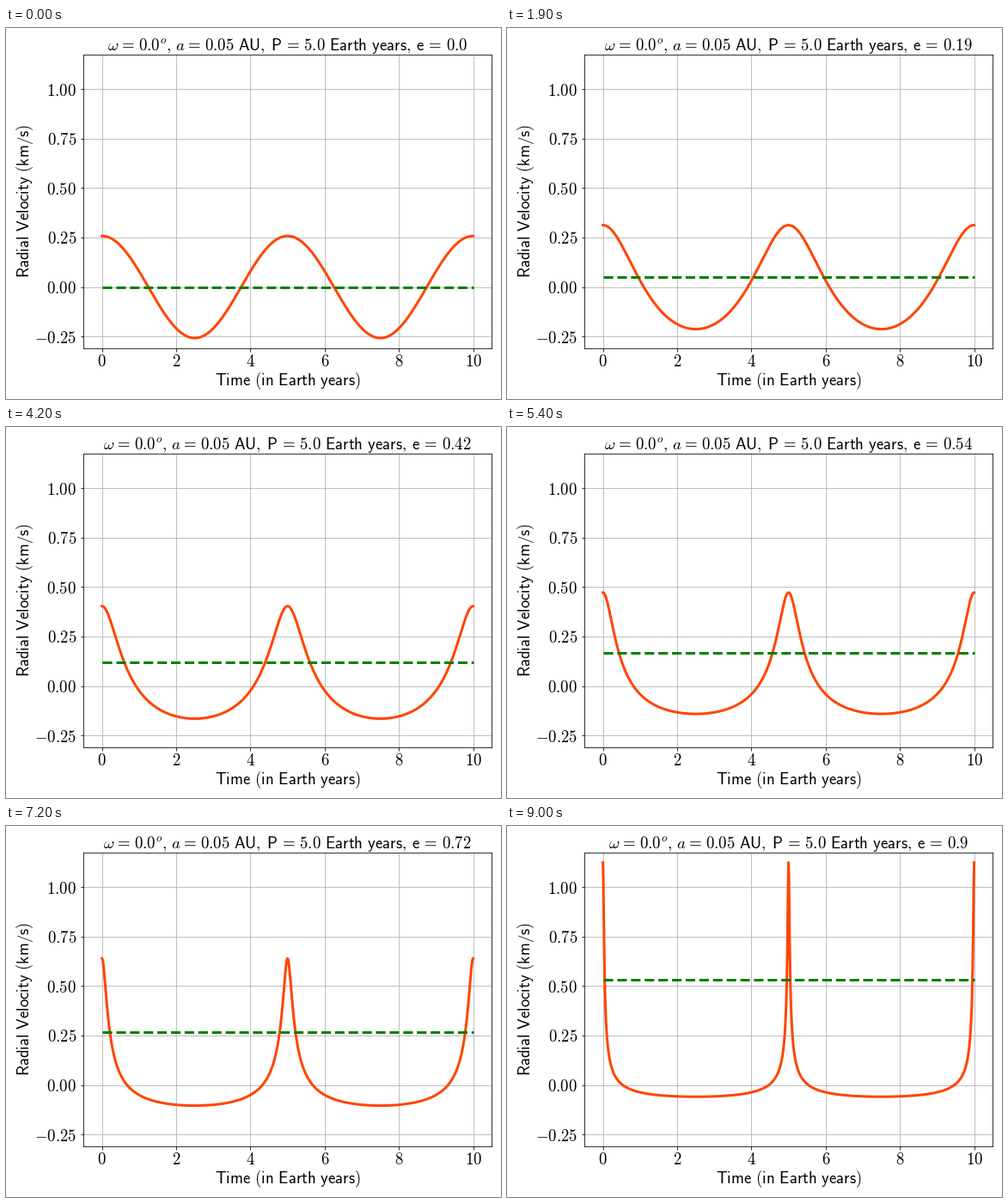
Recreate the animation shown at these times as a matplotlib script. Size 576x432 px, loop 9.1 s.

```python
import numpy as np
import matplotlib.pyplot as plt
from matplotlib.animation import FuncAnimation

W, H, DPI = 576, 432, 72
FRAMES, STEP_MS = 91, 100
LEFT, RIGHT, TOP, BOTTOM = 90.05, 565.2, 30.98, 372.58
SIZE = 18.8

plt.rcParams["mathtext.fontset"] = "cm"

# Orbit: semi-major axis (AU), period (years), inclination
AXIS, PERIOD, INCL = 0.05, 5.0, np.radians(60)
AU_KM, YEAR_S = 1.496e8, 3.156e7
K0 = 2 * np.pi * AXIS * AU_KM * np.sin(INCL) / (PERIOD * YEAR_S)

t = np.linspace(0, 10, 1001)
mean = (2 * np.pi * t / PERIOD + np.pi) % (2 * np.pi) - np.pi


def sans(text):
    """Sans mathtext with the word spacing of running text."""
    text = text.replace(" = ", r"\hspace{0.15}=\hspace{0.15}")
    text = text.replace(", ", r",\hspace{0.25}")
    text = text.replace(" ", r"\hspace{0.36}")
    return rf"\mathsf{{{text}}}"


def velocity(e):
    """Radial velocity along the orbit and its systemic offset."""
    ecc = mean + 0.85 * e * np.sign(mean)
    for _ in range(30):
        ecc -= (ecc - e * np.sin(ecc) - mean) / (1 - e * np.cos(ecc))
    cos_nu = (np.cos(ecc) - e) / (1 - e * np.cos(ecc))
    k = K0 / np.sqrt(1 - e * e)
    return k * (cos_nu + e), k * e


def title_text(e):
    rest = sans(f"0.05 AU, P = 5.0 Earth years, e = {e}")
    return rf"$\omega\hspace{{0.1}}=\hspace{{0.1}}0.0^o,\hspace{{0.13}}a\hspace{{0.08}}=\hspace{{0.08}}{rest}$"


fig = plt.figure(figsize=(W / DPI, H / DPI), dpi=DPI, facecolor="white")
ax = fig.add_axes([LEFT / W, 1 - BOTTOM / H,
                   (RIGHT - LEFT) / W, (BOTTOM - TOP) / H])
ax.set_xlim(-0.5, 10.5)
ax.set_ylim(-K0 - 0.05, velocity(0.9)[0].max() + 0.05)
ax.grid(True)

xticks = np.arange(0, 11, 2)
yticks = np.arange(-0.25, 1.01, 0.25)
ax.set_xticks(xticks, [f"${v}$" for v in xticks], fontsize=SIZE)
ax.set_yticks(yticks, [f"${v:.2f}$" for v in yticks], fontsize=SIZE)
ax.tick_params(axis="x", pad=2.8)
ax.tick_params(axis="y", pad=4.5)

mid_x, mid_y = (LEFT + RIGHT) / 2 / W, 1 - (TOP + BOTTOM) / 2 / H
label = dict(fontsize=SIZE, ha="center", va="baseline", rotation_mode="anchor")
fig.text(mid_x, 1 - 416 / H, f"${sans('Time (in Earth years)')}$", **label)
fig.text(27 / W, mid_y, f"${sans('Radial Velocity (km/s)')}$",
         rotation=90, **label)
title = fig.text(mid_x, 1 - 25.5 / H, "", **label)

curve, = ax.plot([], [], color="orangered", lw=3)
offset, = ax.plot([], [], color="green", lw=3, ls="--")


def draw(i):
    e = round(i * 0.01, 2)
    v, v0 = velocity(e)
    curve.set_data(t, v)
    offset.set_data(t, np.full_like(t, v0))
    title.set_text(title_text(e))
    return curve, offset, title


anim = FuncAnimation(fig, draw, frames=FRAMES, interval=STEP_MS,
                     init_func=lambda: draw(0), repeat=True, repeat_delay=0)
plt.show()
```
